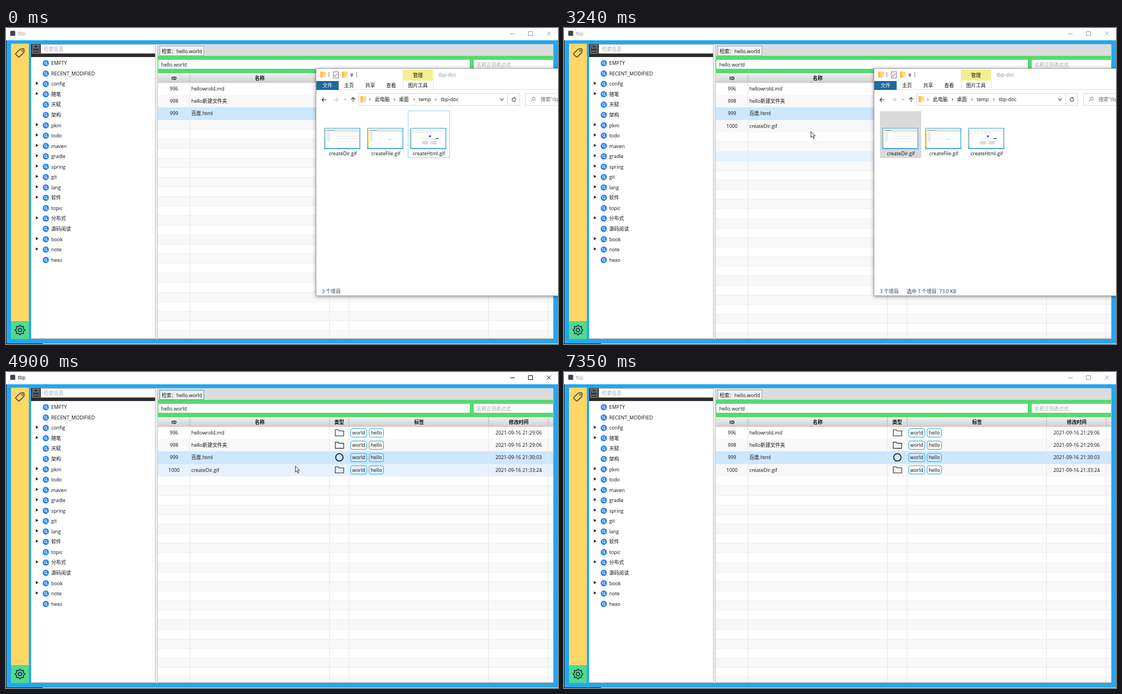
Recreate the animation shown at these times as an HTML page. Size 989 by 566 pixels, loop 7420 ms.

```html
<!DOCTYPE html>
<html lang="zh">
<head>
<meta charset="utf-8">
<title>tbp</title>
<style>
html, body { margin: 0; width: 100%; height: 100%; overflow: hidden; background: #fff; }
svg { display: block; width: 989px; height: 566px; }
text { font: 8.8px "Open Sans", "Noto Sans CJK SC", "Noto Sans CJK", sans-serif; fill: #111; white-space: pre; }
.bold { font-weight: 700; }
.mid { text-anchor: middle; }
rect, .crisp { shape-rendering: crispEdges; }
.soft { shape-rendering: auto; }
#explorer { filter: drop-shadow(0 1px 3px rgba(0, 0, 0, .45)); }
</style>
</head>
<body>
<svg id="stage" viewBox="0 0 989 566" xmlns="http://www.w3.org/2000/svg">
  <defs>
    <linearGradient id="head" x2="0" y2="1"><stop stop-color="#f1f1f1"/><stop offset="1" stop-color="#cecece"/></linearGradient>
    <linearGradient id="glass" x2="1" y2="1"><stop stop-color="#f2fafd"/><stop offset="1" stop-color="#dceef6"/></linearGradient>
  </defs>
</svg>
<script>
const LOOP = 7420;
const stage = document.getElementById('stage');
let layer = stage;

function add(tag, attrs, text) {
  const node = document.createElementNS('http://www.w3.org/2000/svg', tag);
  for (const key in attrs) node.setAttribute(key, attrs[key]);
  if (text) node.textContent = text;
  layer.appendChild(node);
  return node;
}
const box = (x, y, width, height, fill, more) => add('rect', { x, y, width, height, fill, ...more });
// One-pixel border drawn inside the given bounds
const frame = (x, y, w, h, stroke, fill = 'none', more) =>
  box(x + .5, y + .5, w - 1, h - 1, fill, { stroke, ...more });
const label = (x, y, text, more) => add('text', { x, y, ...more }, text);
const stroke = (d, color, width = 1, more) =>
  add('path', { d, fill: 'none', stroke: color, 'stroke-width': width, ...more });
const disc = (cx, cy, r, fill, more) => add('circle', { cx, cy, r, fill, ...more });
function group(build, attrs) {
  const parent = layer;
  const node = add('g', attrs);
  layer = node;
  build();
  layer = parent;
  return node;
}
const show = (node, on) => node.setAttribute('visibility', on ? 'visible' : 'hidden');

// ---- Main window ----
box(0, 0, 989, 22, '#fff');
box(0, 22, 989, 544, '#23a7f2');
box(0, 22, 1, 544, '#222');
box(0, 565, 66, 1, '#222');
box(66, 565, 923, 1, '#cfe6f5');
box(7.5, 5, 9, 9, '#444', { rx: 1.5, class: 'soft' });
const titleText = label(21, 13, 'tbp');
const titleButtons = stroke('M903.5 10.5h8M936 6.5h7.5v7h-7.5zM969 6.5l7 7m0-7l-7 7', '#000');

box(9, 28, 32, 497, '#fed766');
box(9, 525, 32, 32, '#52d991');
stroke('M17.6 45.6L25 38.2Q26 37.4 27.2 37.4L31 37.2Q32.4 37.2 32.4 38.6L32.2 42.6Q32.2 43.6 31.4 44.4L24 51.6Q23 52.4 22 51.6L17.8 47.4Q16.8 46.5 17.6 45.6Z', '#333', 1.4);
disc(28.8, 40.8, 1.3, 'none', { stroke: '#333' });

function gearPath(cx, cy, inner, outer, teeth) {
  let d = '';
  for (let i = 0; i < teeth * 4; i++) {
    const a = (i - .5) / (teeth * 4) * 2 * Math.PI - Math.PI / 2;
    const r = i % 4 < 2 ? outer : inner;
    d += `${i ? 'L' : 'M'}${(cx + r * Math.cos(a)).toFixed(2)} ${(cy + r * Math.sin(a)).toFixed(2)}`;
  }
  return d + 'Z';
}
stroke(gearPath(25, 541, 6.6, 8.7, 8), '#123', 1.4, { 'stroke-linejoin': 'round' });
disc(25, 541, 3, 'none', { stroke: '#123', 'stroke-width': 1.4 });

// ---- Tree ----
box(45, 29, 223, 528, '#fff');
box(45, 29, 223, 23, '#2b2b2b');
frame(47, 30, 13, 16, '#999', '#3a3a3a');
stroke('M50 31v5h7v-5M49 41.5h9', '#999');
frame(62, 29, 206, 17, '#bbb', '#fff');
label(68, 41, '检索信息', { fill: '#a8a8a8', style: 'fill:#a8a8a8' });
const tree = ('EMPTY RECENT_MODIFIED config> 随笔> 天赋 架构 pkm> todo> maven> gradle> spring> ' +
  'git> lang> 软件> topic 分布式> 源码阅读 book> note> hexo').split(' ');
tree.forEach((name, i) => {
  const y = 63 + i * 18.55;
  if (name.endsWith('>')) add('path', { d: `M53.5 ${y - 4}l4.5 2.8l-4.5 2.8z`, fill: '#222' });
  disc(71.3, y, 5.6, '#2a82f2');
  disc(70.8, y - .5, 2, 'none', { stroke: '#fff' });
  stroke(`M72.3 ${y + 1}l1.8 1.8`, '#fff', 1.1);
  label(81, y + 3.2, name.replace('>', ''));
});
box(268, 29, 4, 528, '#ededed');
box(267, 29, 1, 528, '#c4c4c4');
box(271, 29, 1, 528, '#c4c4c4');

// ---- Search panel ----
box(272, 29, 709, 528, '#fff');
box(272, 29, 709, 21, '#dcdcdc');
const tab = frame(275, 32, 80, 18, '#aaa', '#f1f1f1');
label(279, 45, '检索：hello.world');
box(272, 50, 709, 31, '#56da70');
box(273, 57, 558, 16, '#fff');
box(838, 57, 143, 16, '#fff');
label(278, 68.5, 'hello.world');
label(843, 68.5, '名称正则表达式', { style: 'fill:#a8a8a8' });

// ---- Table ----
const ROW = 17.15, TOP = 98, TALL = 22.3;
const fills = ['#fff', '#f8f8f8'];

function emptyRows(first) {
  return group(() => {
    let y = TOP + first * TALL;
    for (let i = first; y < 556; i++, y += ROW) {
      const top = Math.round(y), end = Math.min(556, Math.round(y + ROW));
      box(272, top, 709, end - top, fills[i % 2]);
      box(272, end - 1, 709, 1, '#eee');
    }
  });
}
const blanksBefore = emptyRows(3);
const blanksAfter = emptyRows(4);
[0, 1, 2, 3].forEach(i => {});
box(272, 98, 709, 22, '#fff');
box(272, 120, 709, 22, '#f8f8f8');
const newRowFill = box(272, 165, 709, 22, '#f8f8f8');
const hover = box(272, 0, 709, 17, '#e5f2fe');
box(272, 142, 709, 23, '#cde7ff');
for (const x of [329, 579, 614, 864, 971]) box(x, 98, 1, 458, '#e6e6e6');
box(272, 81, 709, 17, 'url(#head)');
box(272, 97, 709, 1, '#c2c2c2');
for (const x of [329, 579, 614, 864, 971]) box(x, 82, 1, 15, '#bdbdbd');
[[301, 'ID'], [454.5, '名称'], [597, '类型'], [740, '标签'], [918.5, '修改时间']]
  .forEach(([x, name]) => label(x, 93.2, name, { class: 'bold mid' }));

function pill(x, y, w, text) {
  box(x + .5, y - 7.5, w, 15, 'none', { rx: 3.5, stroke: '#28a5dc', class: 'soft' });
  label(x + .5 + w / 2, y + 3.2, text, { class: 'mid' });
}
function fileRow(i, id, name, time, page) {
  const y = 109 + i * 22.1;
  return group(() => {
    label(301, y + 3.2, id, { class: 'mid' });
    label(332, y + 3.2, name);
    if (page) disc(597.3, y - .3, 6.6, 'none', { stroke: '#111', 'stroke-width': 1.6 });
    else stroke(`M590 ${y - 5.5}h5l1.5 2h8.5v9h-15z`, '#2a2024', 1.1);
    pill(617, y, 29, 'world');
    pill(650, y, 26, 'hello');
    label(918.5, y + 3.2, '2021-09-16 ' + time, { class: 'mid' });
  });
}
fileRow(0, '996', 'hellowrold.md', '21:29:06');
fileRow(1, '998', 'hello新建文件夹', '21:29:06');
fileRow(2, '999', '百度.html', '21:30:03', true);
const newRow = fileRow(3, '1000', 'createDir.gif', '21:33:24');
box(980, 29, 1, 528, '#b9c4c9');
box(45, 556, 223, 1, '#b7a58c');
box(272, 556, 709, 1, '#b7a58c');

// ---- File explorer ----
function folder(x, y) {
  box(x, y, 10, 11, '#ffd978');
  box(x, y, 4, 11, '#f3c452');
  box(x + 7, y + 7, 3, 4, '#ffe9ab');
}
function thumb(x, kind) {
  frame(x, 179, 65, 37, '#4fb2ea', '#fdfdfd');
  box(x + 1, 180, 63, 2, '#e8eef2');
  box(x + 63, 180, 2, 37, '#7cbfe4');
  box(x, 215, 65, 2, '#4aa9df');
  box(x + 1, 182, 2, 31, '#f4d675');
  box(x + 1, 213, 2, 3, '#52d991');
  if (kind < 2) {
    box(x + 4, 183, 14, 1, '#777');
    for (let i = 0; i < 9; i++) box(x + 5, 186 + i * 2, 5, 1, '#d3dae4');
    box(x + 18, 182, 45, 2, '#d8e5dc');
    box(x + 18, 185, 45, 1, '#ccc');
    if (!kind) for (let i = 0; i < 4; i++) box(x + 18, 188 + i * 5, 45, 1, '#eee');
    else box(x + 39, 199, 4, 1, '#bbb');
  } else {
    box(x + 4, 184, 58, 1, '#ddd');
    for (let i = 0; i < 6; i++) box(x + 5 + i * 6, 187, 3, 1, '#c8c8c8');
    disc(x + 35.5, 194, 2, '#4a63dc');
    box(x + 23, 198, 23, 2, '#eee');
    box(x + 46, 197, 5, 2, '#4479e8');
    for (let i = 0; i < 3; i++) {
      box(x + 21, 203 + i * 2, 11, 1, '#bbb');
      box(x + 37, 203 + i * 2, 11, 1, '#bbb');
    }
  }
}
const tiles = [566, 643, 720];
let tileMark, focusMark, status;
const explorer = group(() => {
  box(555, 72, 440, 408, '#a5a5a5');
  box(556, 73, 440, 406, '#fff');
  folder(563, 78);
  box(578, 79, 1, 9, '#888');
  frame(586, 78, 10, 12, '#777', '#fff');
  stroke('M588 84l2 2.5l4-5', '#e06a3a', 1.2);
  folder(602, 78);
  box(617, 82, 5, 1, '#222');
  add('path', { d: 'M617 84.5h5l-2.5 2.6z', fill: '#222' });
  box(628, 79, 1, 9, '#888');
  box(711, 75, 54, 19, '#f3f08d');
  label(738, 87.5, '管理', { class: 'mid' });
  label(775, 86.5, 'tbp-doc', { style: 'fill:#8a8a8a' });
  box(556, 95, 40, 16, '#1e6a9c');
  label(576, 106.3, '文件', { class: 'mid', style: 'fill:#fff' });
  [[614.5, '主页'], [652.5, '共享'], [690, '查看'], [738, '图片工具']]
    .forEach(([x, name]) => label(x, 106.3, name, { class: 'mid' }));
  box(596, 110, 393, 1, '#e2e2e2');
  box(711, 94, 1, 16, '#e2e2e2');
  box(765, 94, 1, 16, '#e2e2e2');

  stroke('M574 128.5h-8m3.5-3.5l-3.5 3.5l3.5 3.5M622 132.5v-8m-3.5 3.5l3.5-3.5l3.5 3.5', '#333', 1.1);
  stroke('M587 128.5h8m-3.5-3.5l3.5 3.5l-3.5 3.5', '#c2c2c2', 1.1);
  stroke('M605.5 127l2 2l2-2', '#777');
  frame(631, 117, 290, 22, '#d9d9d9');
  box(898, 118, 1, 20, '#d9d9d9');
  frame(930, 117, 80, 22, '#d9d9d9');
  folder(635, 122);
  for (const x of [651, 695, 730, 769]) stroke(`M${x} 126l2 2l-2 2`, '#444');
  [[661, '此电脑'], [704, '桌面'], [739.5, 'temp'], [779, 'tbp-doc']]
    .forEach(([x, name]) => label(x, 131.2, name));
  stroke('M885.5 126.5l3 3l3-3', '#444', 1.1);
  stroke('M912.5 126.2a3.2 3.2 0 1 1-2.5-1.2M910 123.3l2 1.8l-2 1.8', '#444', 1.1);
  disc(945.5, 126.5, 2.7, 'none', { stroke: '#777' });
  stroke('M943.5 128.5l-3 3', '#777');
  label(958, 131.2, '搜索"tbp-doc"', { style: 'fill:#666' });

  tileMark = box(566, 149, 74, 84, '#d9d9d9');
  focusMark = frame(720, 148, 75, 85, '#99d1f5');
  tiles.forEach((x, i) => thumb(x + 4, i));
  ['createDir.gif', 'createFile.gif', 'createHtml.gif']
    .forEach((name, i) => label(tiles[i] + 37.5, 228, name, { class: 'mid' }));
  label(566, 474.5, '3 个项目', { style: 'fill:#1e395b' });
  status = label(614, 474.5, '选中 1 个项目  73.0 KB', { style: 'fill:#1e395b' });
}, { id: 'explorer' });

// ---- Pointer; its tip is the local origin ----
let ghost, glow;
const pointer = group(() => {
  ghost = group(() => {
    box(-36, -65, 76, 76, '#777', { opacity: .25, class: 'soft', rx: 1 });
    box(-37, -66, 75, 74, 'url(#glass)', { opacity: .9 });
    stroke('M38 -66V8.5H-37', '#8d9ba2', 1, { class: 'crisp' });
    frame(8, 10, 36, 14, '#999', '#fff');
    stroke('M11 17h7M14.5 13.5v7', '#1238c8', 1.6);
    label(21.5, 20.4, '复制', { style: 'fill:#1238c8' });
  });
  glow = disc(-.5, .5, 8.8, '#e9e837', { opacity: .78 });
  add('path', {
    d: 'M.5 .5V11.2L3 8.9L4.8 13L6.6 12.2L4.8 8.2H8.2Z',
    fill: '#fff', stroke: '#333', 'stroke-width': 1, 'stroke-linejoin': 'round'
  });
});

// ---- Motion: held steps of [time, x, y, y used for row hover] ----
const steps = [];
function move(from, to, count, x, y) {
  const [, x0, y0] = steps[steps.length - 1];
  for (let i = 1; i <= count; i++) {
    const k = i / count, e = k * (2 - k) * .4 + k * .6;
    steps.push([from + (to - from) * (i - 1) / (count - 1), x0 + (x - x0) * e, y0 + (y - y0) * e]);
  }
}
steps.push([330, 885, 481], [390, 838, 412], [450, 784, 335]);
move(670, 1120, 8, 592, 214);
move(1580, 1920, 6, 439, 238);
steps.push([3240, 442, 185, 238]);
move(3300, 3890, 10, 496, 37);
steps.push([3990, 495, 36], [4100, 496, 35]);
move(4580, 4900, 6, 518, 168);
steps.push([6410, 655, 273, 230], [6470, 722, 372], [6530, 762, 457],
  [6750, 780, 497], [6815, 798, 542], [6880, 0, 700]);

function rowAt(y, count) {
  const end = TOP + count * TALL;
  if (y < TOP || y >= 556) return null;
  const tall = y < end, size = tall ? TALL : ROW, base = tall ? TOP : end;
  const top = base + Math.floor((y - base) / size) * size;
  return [Math.round(top), Math.min(556, Math.round(top + size))];
}

function draw(t) {
  const active = t >= 4270 && t < 7350;
  const exploring = t < 4270;
  const added = t >= 2520;
  const pressed = t >= 1370 && t < 2520;
  const dragging = t >= 1580 && t < 2520;
  const step = steps.filter(s => s[0] <= t).pop();
  const [, x, y, hoverY = y] = step || [0, 0, 700];

  titleText.style.fill = active ? '#000' : '#999';
  titleButtons.setAttribute('stroke', active ? '#000' : '#999');
  tab.setAttribute('stroke', active ? '#28a5dc' : '#aaa');

  show(explorer, exploring);
  show(focusMark, t < 70);
  show(status, exploring && t >= 1370);
  const over = x >= 566 && x < 640 && y >= 149 && y < 233;
  show(tileMark, exploring && (t >= 1370 || over));
  tileMark.setAttribute('fill', t < 1370 ? '#e5f3ff' : t < 1580 ? '#cce8ff' : '#d9d9d9');

  show(blanksBefore, !added);
  show(blanksAfter, added);
  show(newRow, added);
  show(newRowFill, added);
  const row = x >= 272 && x < (exploring ? 556 : 981) ? rowAt(hoverY, added ? 4 : 3) : null;
  show(hover, row);
  if (row) {
    hover.setAttribute('y', row[0]);
    hover.setAttribute('height', row[1] - row[0]);
    hover.setAttribute('fill', dragging ? '#cde7ff' : '#e5f2fe');
  }

  show(pointer, step && y < 566);
  show(ghost, dragging);
  show(glow, pressed);
  pointer.setAttribute('transform', `translate(${Math.round(x)} ${Math.round(y)})`);
}

const start = performance.now();
function tick() {
  draw((performance.now() - start) % LOOP);
  requestAnimationFrame(tick);
}
tick();
</script>
</body>
</html>
```
